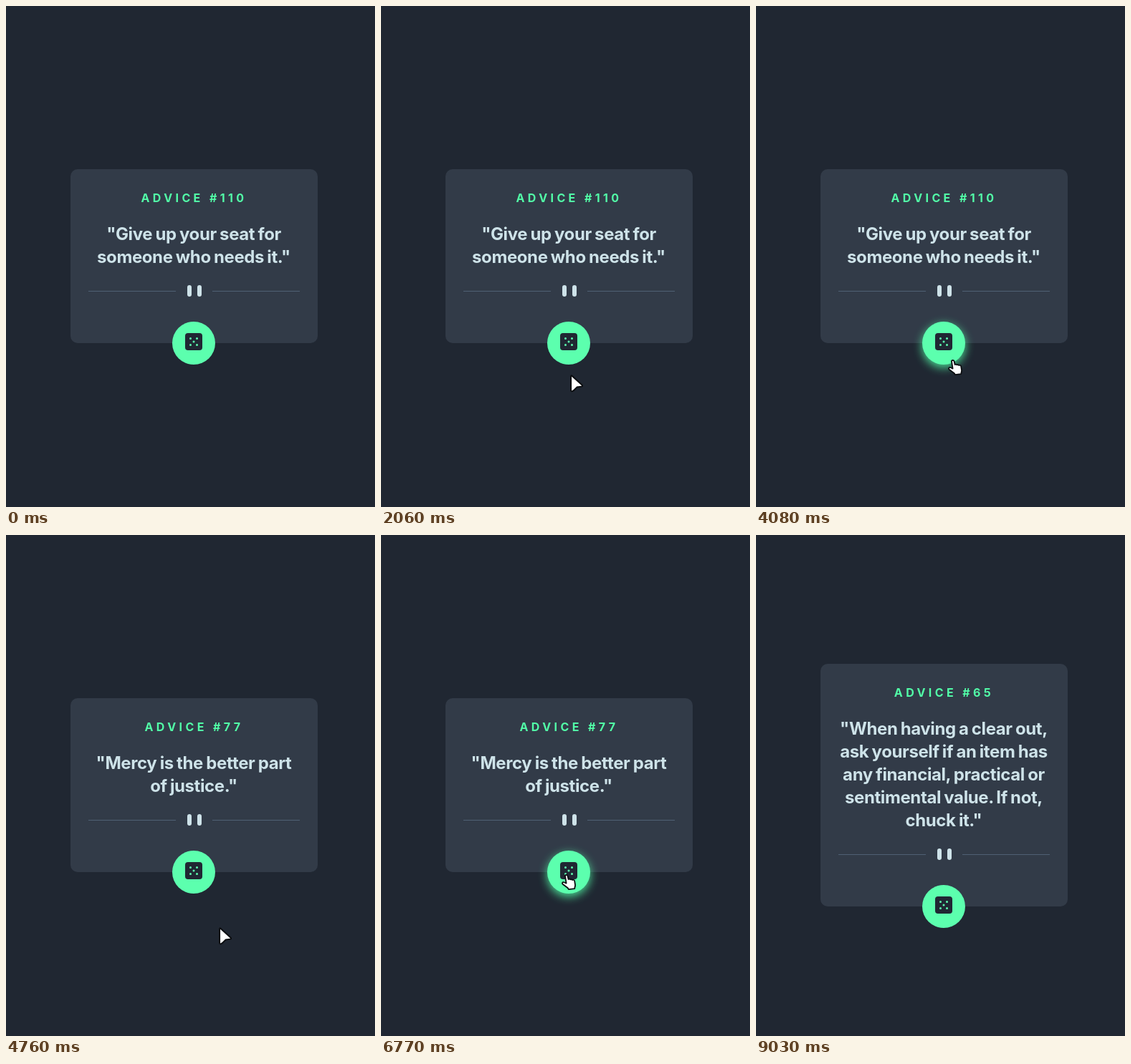
These frames come from a looping animation (515x700 px, 9.26 s). An HTML page:

```html
<!DOCTYPE html>
<html lang="en">
<head>
<meta charset="utf-8">
<title>Advice card</title>
<style>
  html, body { margin: 0; width: 100%; height: 100%; overflow: hidden; background: #202732; }
  svg { display: block; width: 515px; height: 700px; }
  text { font-family: Inter, "Open Sans", sans-serif; font-weight: 700; text-anchor: middle; }
  .title { font-size: 16px; letter-spacing: 4.4px; fill: #52ffa8; }
  .quote { font-size: 24px; letter-spacing: -.4px; word-spacing: -1px; fill: #cee3e9; }
  .cursor path { fill: #fff; stroke: #0b0d10; stroke-width: 1.8; stroke-linejoin: round; }
</style>
</head>
<body>
<svg viewBox="0 0 515 700">
  <defs>
    <filter id="blur" x="-50%" y="-50%" width="200%" height="200%">
      <feGaussianBlur stdDeviation="6.5"/>
    </filter>
  </defs>
  <g id="card">
    <rect id="panel" x="90" width="345" rx="10" fill="#323b48"/>
    <text id="title" class="title" x="262.5" y="46"></text>
    <g id="lines"></g>
    <g id="foot">
      <path d="M115 .5H237M288 .5H410" stroke="#4f6074"/>
      <g fill="#cee3e9">
        <rect x="253" y="-8" width="6" height="16" rx="3"/>
        <rect x="267" y="-8" width="6" height="16" rx="3"/>
      </g>
      <circle id="glow" cx="262" cy="77" r="30" fill="#52ffa8" opacity=".85" filter="url(#blur)"/>
      <circle cx="262" cy="73" r="30" fill="#5cffae"/>
      <rect x="250" y="59" width="24" height="24" rx="4" fill="#202733"/>
      <g id="dots" fill="#5cffae"></g>
    </g>
  </g>
  <circle id="click" r="12" fill="#ff0" opacity=".47"/>
  <g id="cursor" class="cursor">
    <path id="arrow" transform="translate(-1 -1) scale(1.1)" d="M1 2.4Q1 .4 2.5 1.8L15 13.2Q16.4 14.8 14.4 15.1L8.6 16L4.2 20.4Q1.2 22.4 1 19.8Z"/>
    <path id="hand" d="M-1 2.6Q-1.1 1 .6 .9Q2.2 .9 2.6 2.5L3.6 7Q5.2 6 6.4 7.4Q8 6.6 9 8Q11.6 7.3 12.2 9.6L13 14.5Q13.2 16.5 12.5 18.2L12.2 20.2L3.8 21.1L2.8 19.3L-4.2 14Q-5.8 12.4 -4.2 11.2Q-2.8 10.6 .6 12.6Z"/>
  </g>
</svg>
<script>
const LOOP = 9260, MID = 349.5, LINE = 32;

const quotes = [
  { at: 0, id: 110, lines: ['"Give up your seat for', 'someone who needs it."'] },
  { at: 4180, id: 77, lines: ['"Mercy is the better part', 'of justice."'] },
  { at: 7650, id: 65, lines: ['"When having a clear out,', 'ask yourself if an item has',
    'any financial, practical or', 'sentimental value. If not,', 'chuck it."'] }
];

const ease = {
  lin: p => p,
  in: p => p * p,
  out: p => 1 - (1 - p) ** 2,
  both: p => p * p * (3 - 2 * p)
};

// time, x, y, easing used to arrive there
const path = [
  [340, 440, 702, 'lin'],
  [1260, 279, 535, 'out'],
  [1570, 259, 472, 'out'],
  [1960, 259, 472, 'lin'],
  [2060, 265, 516, 'lin'],
  [2480, 271, 542, 'out'],
  [2630, 271, 542, 'lin'],
  [3170, 259, 472, 'both'],
  [3950, 259, 472, 'lin'],
  [4080, 274, 494, 'in'],
  [4180, 274, 494, 'lin'],
  [4760, 298, 549, 'out'],
  [5780, 298, 549, 'lin'],
  [6770, 258, 474, 'both'],
  [7420, 258, 474, 'lin'],
  [7750, 340, 536, 'lin'],
  [8350, 356, 555, 'out'],
  [8375, 356, 555, 'lin'],
  [9030, 494, 702, 'in']
];
const clicks = [3510, 7190], CLICK_MS = 80;

const $ = id => document.getElementById(id);

function add(parent, tag, attrs, text = '') {
  const el = document.createElementNS('http://www.w3.org/2000/svg', tag);
  for (const k in attrs) el.setAttribute(k, attrs[k]);
  el.textContent = text;
  parent.append(el);
}

function move(el, x, y) {
  el.setAttribute('transform', `translate(${x} ${y})`);
}

function show(el, on) {
  el.style.display = on ? '' : 'none';
}

for (const [dx, dy] of [[0, 0], [-1, -1], [1, -1], [-1, 1], [1, 1]])
  add($('dots'), 'circle', { cx: 262 + dx * 4.5, cy: 71 + dy * 4.5, r: 1.5 });

function pointer(t) {
  const i = path.findIndex(k => k[0] > t);
  if (i < 1) return null;
  const [t0, x0, y0] = path[i - 1], [t1, x1, y1, e] = path[i];
  const p = ease[e]((t - t0) / (t1 - t0));
  return [x0 + (x1 - x0) * p, y0 + (y1 - y0) * p];
}

let shown;
function setQuote(q) {
  if (q === shown) return;
  shown = q;
  const h = 179 + LINE * q.lines.length;
  const top = MID - h / 2;
  q.buttonY = top + h;
  move($('card'), 0, top);
  $('panel').setAttribute('height', h);
  $('title').textContent = 'ADVICE #' + q.id;
  $('lines').textContent = '';
  q.lines.forEach((s, i) =>
    add($('lines'), 'text', { class: 'quote', x: 262, y: 99 + LINE * i }, s));
  move($('foot'), 0, h - 73);
}

function draw(t) {
  setQuote(quotes.filter(q => q.at <= t).pop());
  const pos = pointer(t);
  const hover = !!pos && Math.hypot(pos[0] - 262, pos[1] - shown.buttonY) < 30;
  show($('cursor'), pos);
  show($('glow'), hover);
  show($('hand'), hover);
  show($('arrow'), !hover);
  show($('click'), pos && clicks.some(c => t >= c && t < c + CLICK_MS));
  if (pos) {
    const [x, y] = pos.map(Math.round);
    move($('cursor'), x, y);
    move($('click'), x, y);
  }
}

const start = performance.now();
function tick() {
  draw((performance.now() - start) % LOOP);
  requestAnimationFrame(tick);
}
tick();
</script>
</body>
</html>
```
